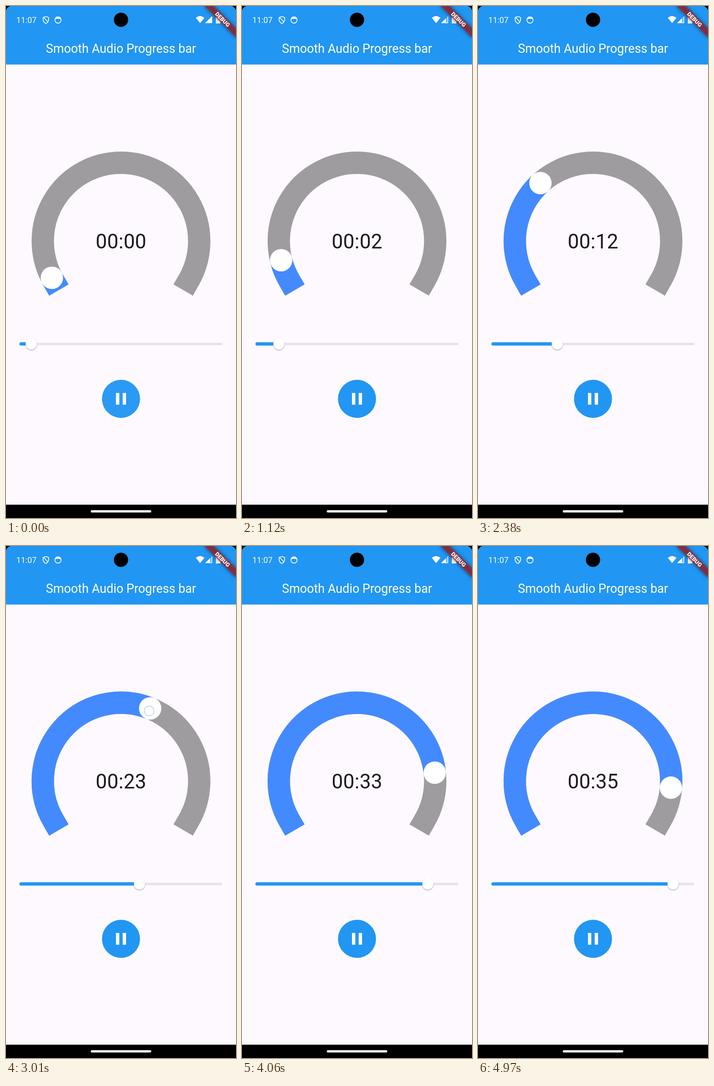
Recreate the animation shown at these times as an HTML page. Size 502 by 1115 pixels, loop 5040 ms.

```html
<!DOCTYPE html>
<html lang="en">
<head>
<meta charset="utf-8">
<title>Smooth Audio Progress bar</title>
<style>
html, body { margin: 0; width: 100%; height: 100%; overflow: hidden; background: #000; }
svg { display: block; width: 100%; height: 100%; font-family: Roboto, sans-serif; }
</style>
</head>
<body>
<svg viewBox="0 0 502 1115">
  <defs>
    <filter id="soft" x="-30%" y="-120%" width="160%" height="340%"><feGaussianBlur stdDeviation="4.5"/></filter>
    <filter id="lift" x="-30%" y="-30%" width="160%" height="160%"><feGaussianBlur stdDeviation="1"/></filter>
    <clipPath id="screen"><path d="M0 1115V13A13 13 0 0 1 13 0H489A13 13 0 0 1 502 13V1115Z"/></clipPath>
  </defs>
  <g clip-path="url(#screen)">
    <rect width="502" height="1086" fill="#fef9fe"/>
    <rect width="502" height="127.5" fill="#2196f3"/>

    <!-- status bar -->
    <g fill="#fff">
      <text x="22.6" y="36.7" font-size="17.7">11:07</text>
      <g fill="none" stroke="#fff" stroke-width="1.7">
        <path d="M87 22.8L93 25V30Q92.500 35.500 87 38.200Q81.500 35.500 81 30V25Z"/>
        <path d="M82.500 25L91.500 35"/>
        <circle cx="113.5" cy="30.5" r="6.8"/>
      </g>
      <path d="M107 29A6.800 6.800 0 0 1 120 29Q113.500 26.500 107 29Z"/>
      <path d="M414.300 25.800Q423.700 18.200 433.100 25.800L423.700 37.300Z"/>
      <path d="M434.500 37.300L450 22V37.300Z" fill-opacity=".35"/>
      <path id="signal"/>
      <path d="M458 23H461V21H465V23H468V38H458Z"/>
    </g>
    <circle cx="251" cy="30" r="15.6"/>
    <text x="251" y="102" font-size="26.8" fill="#fff" text-anchor="middle">Smooth Audio Progress bar</text>

    <g transform="translate(502 0) rotate(45)">
      <rect x="-48.8" y="34.1" width="97.6" height="14.6" opacity=".5" filter="url(#soft)"/>
      <rect x="-48.8" y="34.1" width="97.6" height="14.6" fill="#b71c1c" fill-opacity=".627"/>
      <text y="45.800" font-size="12.4" font-weight="900" fill="#fff" text-anchor="middle">DEBUG</text>
    </g>

    <!-- dial -->
    <g fill="none" stroke-width="48.8">
      <path id="track" stroke="#9e9c9f"  stroke-linecap="square"/>
      <path id="done" stroke="#448aff"/>
    </g>
    <circle id="knob" r="24.4" fill="#fff"/>
    <text id="clock" x="251.200" y="527.500" font-size="43.9" letter-spacing=".3" fill="#1d1b20" text-anchor="middle"></text>

    <!-- slider -->
    <rect x="29.300" y="733.500" width="443" height="4.900" rx="2.400" fill="#e7e0ec"/>
    <rect id="bar" x="29.300" y="732.300" height="7.300" rx="3.600" fill="#2196f3"/>
    <g id="thumb">
      <circle cy="737.300" r="12.200" opacity=".35" filter="url(#lift)"/>
      <circle cy="736" r="12.200" fill="#fff"/>
    </g>

    <!-- pause button -->
    <circle cx="251" cy="855.500" r="41.500" fill="#2196f3"/>
    <circle id="splash" cx="251" cy="855.500" r="41.500" fill="#fff"/>
    <path d="M240 842.700h7.300v25.600h-7.300zM254.700 842.700h7.300v25.600h-7.300z" fill="#fff"/>

    <circle id="touch" r="10.500" fill="#fff" fill-opacity=".12" stroke="#b0cbee" stroke-width="1.300"/>
    <rect y="1086" width="502" height="29"/>
    <rect x="185" y="1098" width="132" height="5" rx="2.500" fill="#fff"/>
  </g>
</svg>
<script>
const LOOP = 5040, STEP = 70, LENGTH = 40, R = 170.7;
const el = id => document.getElementById(id);
const set = (id, attrs) => { for (const k in attrs) el(id).setAttribute(k, attrs[k]); };

// [ms, value] keys; two keys at the same time make a jump
const AUDIO = [[0, .35], [1720, 3.88], [2030, 3.88], [2030, 9.5], [2380, 12.96],
               [3010, 23.65], [3600, 33.05], [4060, 33.97], [5040, 35.94]];
const REACH = [[1890, 137], [2310, 150], [3010, 164.7], [3600, 168]];

function along(keys, t) {
  let i = 1;
  while (i < keys.length - 1 && t >= keys[i][0]) i++;
  const [t0, a] = keys[i - 1], [t1, b] = keys[i];
  return a + (b - a) * (t - t0) / (t1 - t0);
}

function polar(deg, r = R) {
  const a = deg * Math.PI / 180;
  return [251 + r * Math.cos(a), 512 + r * Math.sin(a)];
}

const arcTo = (sweep, end) => `A${R} ${R} 0 ${sweep > 180 ? 1 : 0} 1 ${end}`;
const start = polar(150);
set('track', { d: `M${start}${arcTo(240, polar(390))}` });

function draw(t) {
  const sec = along(AUDIO, t), sweep = 240 * sec / LENGTH;
  const end = polar(150 + sweep);
  set('done', { d: `M${start[0] + 12.2} ${start[1] + 21.1}L${start}${arcTo(sweep, end)}` });
  set('knob', { cx: end[0], cy: end[1] });
  el('clock').textContent = '00:' + String(Math.floor(sec)).padStart(2, '0');

  // the slider runs ahead of the dial until it is synchronised
  const shown = sec + (t < 1260 ? 1.97 : 0);
  const x = 443 * shown / LENGTH;
  set('bar', { width: x });
  set('thumb', { transform: `translate(${29.3 + x} 0)` });

  const pressed = t >= 1890 && t < 2310 || t >= 2450 && t < 3600;
  const angle = t < 2030 ? 206.7 : 150 + sweep;
  const [px, py] = polar(angle, along(REACH, t));
  set('touch', { cx: px, cy: py, visibility: pressed ? 'visible' : 'hidden' });

  set('splash', { opacity: .04 * Math.max(0, 1 - t / 500) });
  set('signal', { d: t < 630 ? 'M434.5 37.3L450 22V37.3Z' : 'M434.5 37.3L445 27V37.3ZM448.7 23.3L450 22V37.3H445V36H448.7Z' });
}

const origin = performance.now();
function tick() {
  const t = (performance.now() - origin) % LOOP;
  draw(Math.floor(t / STEP) * STEP);
  requestAnimationFrame(tick);
}
tick();
</script>
</body>
</html>
```
